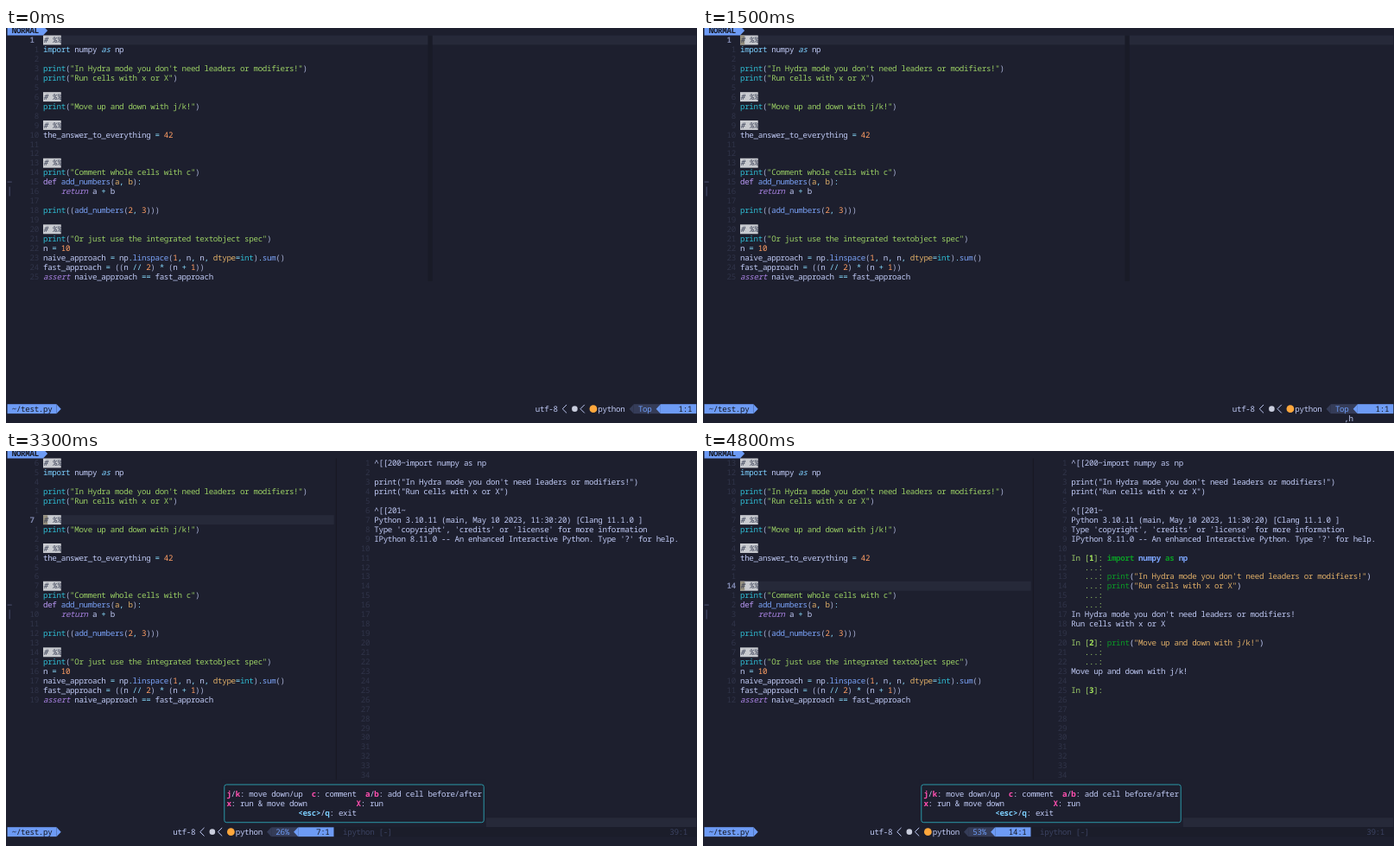
An HTML page with a canvas for the animation above (5000 ms loop, 800 by 457 pixels).

```html
<!DOCTYPE html>
<html lang="en">
<head>
<meta charset="utf-8">
<title>Cell mode in a terminal editor</title>
<style>
  html, body { margin: 0; width: 100%; height: 100%; overflow: hidden; background: #1d1f2e; }
  canvas { display: block; width: 800px; height: 457px; }
</style>
</head>
<body>
<canvas id="stage"></canvas>
<script>
const W = 800, H = 457, LOOP = 5000;
const canvas = document.getElementById('stage');
const ctx = canvas.getContext('2d');
const dpr = window.devicePixelRatio || 1;
canvas.width = W * dpr;
canvas.height = H * dpr;
ctx.scale(dpr, dpr);

// Terminal grid
const CW = 5.18, RH = 10.94, X0 = 1.56, Y0 = 3.06;
const COLS = 154, SPLIT = 73, STATUS = 40;
const colX = c => X0 + c * CW;
const rowY = r => Y0 + r * RH;

const BG = '#1d1f2e', FG = '#c0caf5', BLUE = '#6d9bf5', INK = '#171924';
const DIM = '#303449', LINE = '#262939', DARK = '#191b27', SLATE = '#353c58';

// Style letters used in marked-up text: ¦<letter>text
const STYLES = {
  f: [FG], p: ['#a9b1d6'], t: ['#2fbcd3'], i: ['#7dcfff'], I: ['#7dcfff', 'italic'],
  g: ['#9bd064'], o: ['#ff9e64'], y: ['#e0af68'], b: ['#7aa2f7'], v: ['#bb9af7'],
  V: ['#a781e0', 'italic'], c: ['#89ddff'], h: ['#3a4056', 'italic'],
  G: ['#9ece6a'], N: ['#a8e85c', 'bold'], K: ['#0b9a26', 'bold'], k: ['#0b9a26'],
  B: ['#7aa2f7', 'bold'], m: ['#ff4fb0', 'bold'], e: ['#7dcfff', 'bold'],
  d: [DIM], D: ['#3b4261'], L: ['#7e86ad', 'bold'], n: [INK, 'bold'], s: [INK], u: [BLUE]
};

const fontFor = look => `${look || 'normal'} 9.2px "Noto Sans Mono", "DejaVu Sans Mono", monospace`;
ctx.textRendering = 'geometricPrecision';
ctx.font = fontFor();
const tracking = CW - ctx.measureText('m').width;

function text(col, row, marked) {
  ctx.letterSpacing = tracking + 'px';
  for (const part of marked.split('¦').slice(1)) {
    const [color, look] = STYLES[part[0]];
    const s = part.slice(1);
    ctx.font = fontFor(look);
    ctx.fillStyle = color;
    ctx.fillText(s, colX(col), rowY(row) + 3.2);
    col += s.length;
  }
}

function cells(col, row, cols, rows, color) {
  ctx.fillStyle = color;
  ctx.fillRect(colX(col), rowY(row) - RH / 2, cols * CW, rows * RH);
}

function path(points, color, fill) {
  ctx.beginPath();
  points.forEach(([x, y]) => ctx.lineTo(x, y));
  if (fill) {
    ctx.fillStyle = color;
    ctx.fill();
  } else {
    ctx.strokeStyle = color;
    ctx.lineWidth = 1;
    ctx.stroke();
  }
}

// Powerline wedge in one cell; dir 1 points right, -1 left
function wedge(col, row, dir, color) {
  const base = colX(dir > 0 ? col : col + 1), y = rowY(row), h = RH / 2;
  path([[base, y - h], [base + dir * CW, y], [base, y + h]], color, true);
}

function chevron(col, row) {
  const x = colX(col), y = rowY(row);
  path([[x + 5.2, y - 4.8], [x + 0.4, y], [x + 5.2, y + 4.8]], FG, false);
}

function dot(x, y, r, color) {
  ctx.beginPath();
  ctx.arc(x, y, r, 0, Math.PI * 2);
  ctx.fillStyle = color;
  ctx.fill();
}

const say = s => `¦tprint¦p(¦g"${s}"¦p)`;
const echo = s => `¦kprint¦f(¦y"${s}"¦f)`;
const MARK = '# %%';
const HELLO = "In Hydra mode you don't need leaders or modifiers!";
const RUN = 'Run cells with x or X';
const MOVE = 'Move up and down with j/k!';

const code = [
  MARK,
  '¦iimport¦f numpy ¦Ias¦f np',
  '',
  say(HELLO),
  say(RUN),
  '',
  MARK,
  say(MOVE),
  '',
  MARK,
  '¦fthe_answer_to_everything ¦c= ¦o42',
  '',
  '',
  MARK,
  say('Comment whole cells with c'),
  '¦vdef ¦badd_numbers¦p(¦ya¦c, ¦yb¦p)¦c:',
  '¦V    return¦f a ¦c+¦f b',
  '',
  '¦tprint¦p((¦badd_numbers¦p(¦o2¦c, ¦o3¦p)))',
  '',
  MARK,
  say('Or just use the integrated textobject spec'),
  '¦fn ¦c= ¦o10',
  '¦fnaive_approach ¦c= ¦fnp¦c.¦blinspace¦p(¦o1¦c, ¦fn¦c, ¦fn¦c, ¦ydtype¦c=¦tint¦p)¦c.¦bsum¦p()',
  '¦ffast_approach ¦c= ¦p((¦fn ¦c// ¦o2¦p) ¦c* ¦p(¦fn ¦c+ ¦o1¦p))',
  '¦Vassert¦f naive_approach ¦c== ¦ffast_approach'
];

const prompt = n => `¦GIn [¦N${n}¦G]: `;
const MORE = '¦G   ...: ';

// [time, row, text] in the terminal pane
const output = [
  [3100, 1, '¦f^[[200~import numpy as np'],
  [3100, 3, `¦fprint("${HELLO}")`],
  [3100, 4, `¦fprint("${RUN}")`],
  [3100, 6, '¦f^[[201~'],
  [3300, 7, '¦fPython 3.10.11 (main, May 10 2023, 11:30:20) [Clang 11.1.0 ]'],
  [3300, 8, "¦fType 'copyright', 'credits' or 'license' for more information"],
  [3300, 9, "¦fIPython 8.11.0 -- An enhanced Interactive Python. Type '?' for help."],
  [3500, 11, prompt(1)],
  [3600, 11, '¦f        ¦Kimport ¦Bnumpy ¦Kas ¦Bnp'],
  [3600, 12, MORE],
  [3600, 13, MORE + echo(HELLO)],
  [3600, 14, MORE + echo(RUN)],
  [3600, 15, MORE],
  [3600, 16, MORE],
  [3600, 17, '¦f' + HELLO],
  [3600, 18, '¦f' + RUN],
  [3600, 20, prompt(2)],
  [4500, 20, '¦f        ' + echo(MOVE)],
  [4500, 21, MORE],
  [4500, 22, MORE],
  [4600, 23, '¦f' + MOVE],
  [4600, 25, prompt(3)]
];

const shownCursor = [[500, 1000], [1300, 2000], [2500, 4000], [4500, 5000]];

function drawTabline() {
  cells(0, 0, 8, 1, BLUE);
  wedge(8, 0, 1, BLUE);
  text(1, 0, '¦nNORMAL');
}

function drawEditor(t, line, cols) {
  cells(8, line, cols - 8, 1, LINE);
  if (cols > 94) cells(94, 1, 1, code.length, DARK);
  code.forEach((src, i) => {
    const row = i + 1;
    if (row === line) text(5, row, '¦L' + row);
    else text(5, row, '¦d' + String(Math.abs(row - line)).padStart(2));
    if (src === MARK) {
      cells(8, row, 4, 1, '#c9cbd0');
      const blink = shownCursor.some(([a, b]) => t >= a && t < b);
      if (row === line && blink) cells(8, row, 1, 1, '#96907f');
      text(8, row, '¦h' + MARK);
    } else if (src) {
      text(8, row, src);
    }
  });
  const mid = X0 + CW / 2;
  path([[X0, rowY(16)], [X0 + CW, rowY(16)]], '#4a5070', false);
  path([[mid, rowY(17) - RH / 2], [mid, rowY(17) + RH / 2]], '#4a5070', false);
}

function drawStatus(line, end) {
  const at = n => end - n;
  const y = rowY(STATUS);
  cells(0, STATUS, 11, 1, BLUE);
  wedge(11, STATUS, 1, BLUE);
  text(1, STATUS, '¦s~/test.py');

  text(at(36), STATUS, '¦futf-8');
  chevron(at(30), STATUS);
  dot(colX(at(28)) + 4.2, y, 3.3, '#c9cddd');
  chevron(at(26), STATUS);
  dot(colX(at(24)) + 5, y, 4.4, '#ffa73c');
  text(at(22), STATUS, '¦fpython');

  wedge(at(15), STATUS, -1, SLATE);
  cells(at(14), STATUS, 6, 1, SLATE);
  const place = line === 1 ? 'Top' : Math.floor(line / code.length * 100) + '%';
  text(at(13), STATUS, '¦u' + place);
  wedge(at(9), STATUS, -1, BLUE);
  cells(at(8), STATUS, 8, 1, BLUE);
  text(at(6), STATUS, '¦s' + `${line}:1`.padStart(5));
}

function drawTerminal(t) {
  const x = colX(SPLIT) + CW / 2;
  path([[x, rowY(1) - RH / 2], [x, rowY(STATUS) - RH / 2]], '#171822', false);
  cells(SPLIT + 1, 39, COLS - SPLIT - 1, 1, LINE);
  for (let n = 1; n < STATUS; n++) text(79, n, '¦d' + String(n).padStart(2));
  for (const [from, row, s] of output) if (t >= from) text(82, row, s);
  cells(SPLIT, STATUS, COLS - SPLIT, 1, '#1b1d2a');
  text(75, STATUS, '¦Dipython [-]');
  text(148, STATUS, '¦D39:1');
}

function drawHint() {
  cells(48, 35, 59, 5, BG);
  const x = colX(48.5), y = rowY(35);
  ctx.beginPath();
  ctx.roundRect(x, y, 58 * CW, 4 * RH, 2.5);
  ctx.strokeStyle = '#2b98a8';
  ctx.lineWidth = 1;
  ctx.stroke();
  text(49, 36, '¦mj¦f/¦mk¦f: move down/up  ¦mc¦f: comment  ¦ma¦f/¦mb¦f: add cell before/after');
  text(49, 37, '¦mx¦f: run & move down           ¦mX¦f: run');
  text(65, 38, '¦e<esc>¦f/¦eq¦f: exit');
}

function draw(t) {
  const split = t >= 3100;
  const line = t >= 4500 ? 14 : split ? 7 : 1;
  const end = split ? SPLIT : COLS;
  ctx.fillStyle = BG;
  ctx.fillRect(0, 0, W, H);
  drawTabline();
  drawEditor(t, line, end);
  drawStatus(line, end);
  if (split) drawTerminal(t);
  if (t >= 1300 && t < 2000) text(143, 41, t < 1500 ? '¦f,' : '¦f,h');
  if (t >= 2000) drawHint();
}

const start = performance.now();
function tick() {
  draw((performance.now() - start) % LOOP);
  requestAnimationFrame(tick);
}
tick();
</script>
</body>
</html>
```
